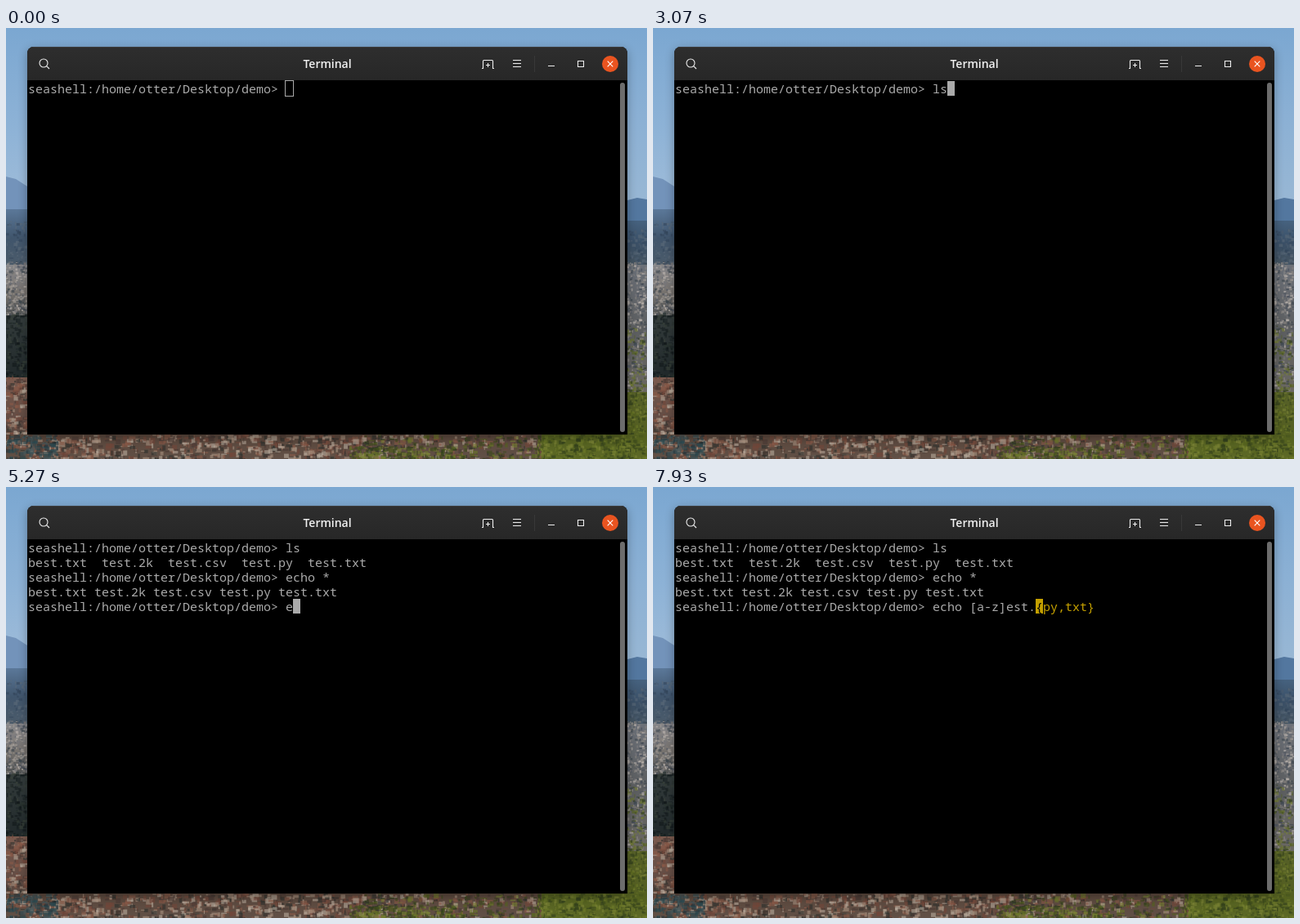
An HTML page with a canvas that plays this animation: 784 by 528 pixels, repeating every 8000 ms.

```html
<!DOCTYPE html>
<html lang="en">
<head>
<meta charset="utf-8">
<title>Terminal</title>
<style>
  html, body { margin: 0; width: 100%; height: 100%; overflow: hidden; background: #7ba7d1; }
  #stage { position: absolute; left: 0; top: 0; width: 784px; height: 528px; overflow: hidden; }
  canvas { position: absolute; left: 0; top: 0; }
  #window, #shade {
    position: absolute; left: 26px; top: 23px; width: 734px; height: 475px;
    border-radius: 8px 8px 0 0;
  }
  #window { background: #000; overflow: hidden; }
  #shade { box-shadow: 0 3px 12px rgba(0, 0, 0, .3); }
  #bar { height: 41px; background: linear-gradient(#2e2e2e, #272727); box-shadow: inset 0 1px #3c3c3c; }
  #bar h1 {
    margin: 0; text-align: center; color: #f2f2f2;
    font: 600 14px/41px "Open Sans", "Noto Sans", sans-serif;
  }
  #bar svg { position: absolute; left: 0; top: 0; }
  #screen {
    position: absolute; left: 1px; top: 42px; margin: 0; white-space: pre; color: #aaa;
    font: 15px/18px "Noto Sans Mono", "Liberation Mono", monospace;
    font-variant-ligatures: none;
  }
  #cursor { display: inline-block; width: 9px; height: 18px; vertical-align: top; }
  #cursor.block { background: #aaa; }
  #cursor.hint { background: #c4a000; color: #000; }
  #cursor.hollow { outline: 1px solid #aaa; }
  #rest { color: #c4a000; }
  #scroll {
    position: absolute; left: 725px; top: 44px; width: 6px; height: 428px;
    border-radius: 3px; background: #6c6c6c;
  }
</style>
</head>
<body>
<div id="stage">
  <canvas id="photo" width="784" height="528"></canvas>
  <div id="shade"></div>
  <div id="window">
    <div id="bar">
      <h1>Terminal</h1>
      <svg width="734" height="41" viewBox="26 23 734 41" fill="none" stroke="#eee" stroke-width="1.1">
        <circle cx="46" cy="43" r="5"/>
        <path d="M49.6 46.6L53 50"/>
        <path d="M582 49.5H583.5V40.5Q583.5 39.5 584.5 39.5H594.5Q595.5 39.5 595.5 40.5V49.5H597M587 45.5H592M589.5 43V48"/>
        <path d="M620 39.5H630M620 43.5H630M620 47.5H630M663 46.5H671M699.5 40.5H706.5V47.5H699.5Z"/>
        <path d="M646.5 34V54" stroke="#383838" stroke-width="1"/>
        <circle cx="739" cy="44" r="10" fill="#e95420" stroke="none"/>
        <path d="M735.7 40.7L742.3 47.3M742.3 40.7L735.7 47.3" stroke="#fff"/>
      </svg>
    </div>
    <pre id="screen"><span id="log"></span><span id="typed"></span><span id="cursor"></span><span id="rest"></span></pre>
    <div id="scroll"></div>
  </div>
</div>
<script>
const $ = id => document.getElementById(id);

// Backdrop: soft bands with scattered roofs and trees
const ctx = $('photo').getContext('2d');
let seed = 7;
const random = () => (seed = (seed * 16807) % 2147483647) / 2147483647;

function band(x, y, w, h, ...colors) {
  const fill = ctx.createLinearGradient(0, y, 0, y + h);
  colors.forEach((color, i) => fill.addColorStop(i / (colors.length - 1), color));
  ctx.fillStyle = fill;
  ctx.fillRect(x, y, w, h);
}

function scatter(x, y, w, h, count, size, colors) {
  ctx.save();
  ctx.beginPath();
  ctx.rect(x, y, w, h);
  ctx.clip();
  ctx.globalAlpha = .6;
  for (let i = 0; i < count; i++) {
    ctx.fillStyle = colors[Math.floor(random() * colors.length)];
    ctx.fillRect(x - 2 + random() * w, y + random() * h,
      1 + random() * size, 1 + random() * size * .8);
  }
  ctx.restore();
}

function hill(color, ...points) {
  ctx.fillStyle = color;
  ctx.beginPath();
  points.forEach(([x, y]) => ctx.lineTo(x, y));
  ctx.fill();
}

const forest = ['#34475c', '#4a5c6e', '#5a6a78'];
const town = ['#a8a29c', '#77777c', '#c2bab2', '#4b5360', '#8d8782', '#3a434c'];
const roofs = ['#8a5a48', '#a8917f', '#4a3a34', '#b8aa9c', '#2c302c', '#74463a'];
const woods = ['#1a2223', '#2a3430', '#12181a', '#3a423a'];
const scrub = ['#55631f', '#6c7828', '#3d4a1c', '#7c8436', '#303c1c'];

band(0, 0, 784, 240, '#7ba7d1', '#8db2d6', '#a4bfda');
band(760, 0, 24, 215, '#7ba7d1', '#8bb0d4', '#98b7d4');
hill('#7393ba', [0, 182], [12, 185], [26, 194], [26, 240], [0, 240]);
hill('#53779f', [760, 211], [772, 208], [784, 210], [784, 250], [760, 250]);
band(0, 222, 26, 70, '#5b7899', '#40556c', '#4b5a68');
band(760, 236, 24, 56, '#46627f', '#3a4f66', '#46545f');
scatter(0, 236, 26, 56, 80, 4, forest);
scatter(760, 246, 24, 46, 70, 4, forest);

band(0, 290, 26, 66, '#86868a', '#77736f', '#4b4e4e');
scatter(0, 286, 26, 66, 240, 3, town);
band(760, 290, 24, 160, '#6b7078', '#5c5e60', '#6b6862');
scatter(760, 286, 24, 78, 210, 3, town);
scatter(760, 364, 24, 86, 200, 4, [...town, ...scrub]);

band(0, 352, 26, 78, '#343c3c', '#20282a');
scatter(0, 348, 26, 80, 150, 5, woods);
band(0, 428, 26, 100, '#7b5a4e', '#4a3f3a');
scatter(0, 426, 26, 74, 140, 6, roofs);
band(760, 446, 24, 82, '#566028', '#525e1e');
scatter(760, 442, 24, 86, 200, 4, scrub);

band(0, 498, 784, 30, '#5a473c', '#615046');
scatter(0, 498, 470, 30, 850, 7, roofs);
scatter(0, 498, 64, 30, 130, 7, ['#2c4a50', '#22333a', '#42565a']);
scatter(430, 498, 225, 30, 440, 6, [...scrub, ...roofs]);
scatter(420, 512, 130, 16, 170, 6, scrub);
band(655, 498, 129, 30, '#525e20', '#5e6a26');
scatter(650, 498, 134, 30, 400, 5, scrub);

// Shell session
const LOOP = 8000, BLINK = 600, FOCUS = 70;
const prompt = 'seashell:/home/otter/Desktop/demo> ';
const history = ['echo *', 'echo [a-z]est.{py,txt}'];
const commands = [
  { text: 'ls', keys: [2870, 3070], enter: 3270,
    output: 'best.txt  test.2k  test.csv  test.py  test.txt' },
  { text: history[0], keys: [3600, 3870, 4000, 4130, 4270, 4530], enter: 4930,
    output: 'best.txt test.2k test.csv test.py test.txt' },
  { text: history[1], enter: Infinity,
    keys: [5270, 5470, 5600, 5730, 5870, 6070, 6270, 6730, 6930, 7130, 7330, 7470, 7730, 7930] }
];

function render(time) {
  let log = '', lastKey = 130;
  let index = 0;
  while (time >= commands[index].enter) {
    const { text, output, enter } = commands[index++];
    log += `${prompt}${text}\n${output}\n`;
    lastKey = enter;
  }
  const { text, keys } = commands[index];
  const pressed = keys.filter(key => key <= time);
  const typed = text.slice(0, pressed.length);
  lastKey = pressed.at(-1) ?? lastKey;

  // Suggestions start at the second character
  const match = typed.length > 1 && history.find(line => line.startsWith(typed));
  const hint = match ? match.slice(typed.length) : '';
  const hidden = time > lastKey && Math.floor((time - lastKey) / BLINK) % 2;

  $('log').textContent = log + prompt;
  $('typed').textContent = typed;
  $('cursor').textContent = hint[0] || ' ';
  $('cursor').className = time < FOCUS ? 'hollow' : hidden ? '' : hint ? 'hint' : 'block';
  $('rest').textContent = hint.slice(1);
}

function tick(now) {
  render(now % LOOP);
  requestAnimationFrame(tick);
}
render(0);
requestAnimationFrame(tick);
</script>
</body>
</html>
```
